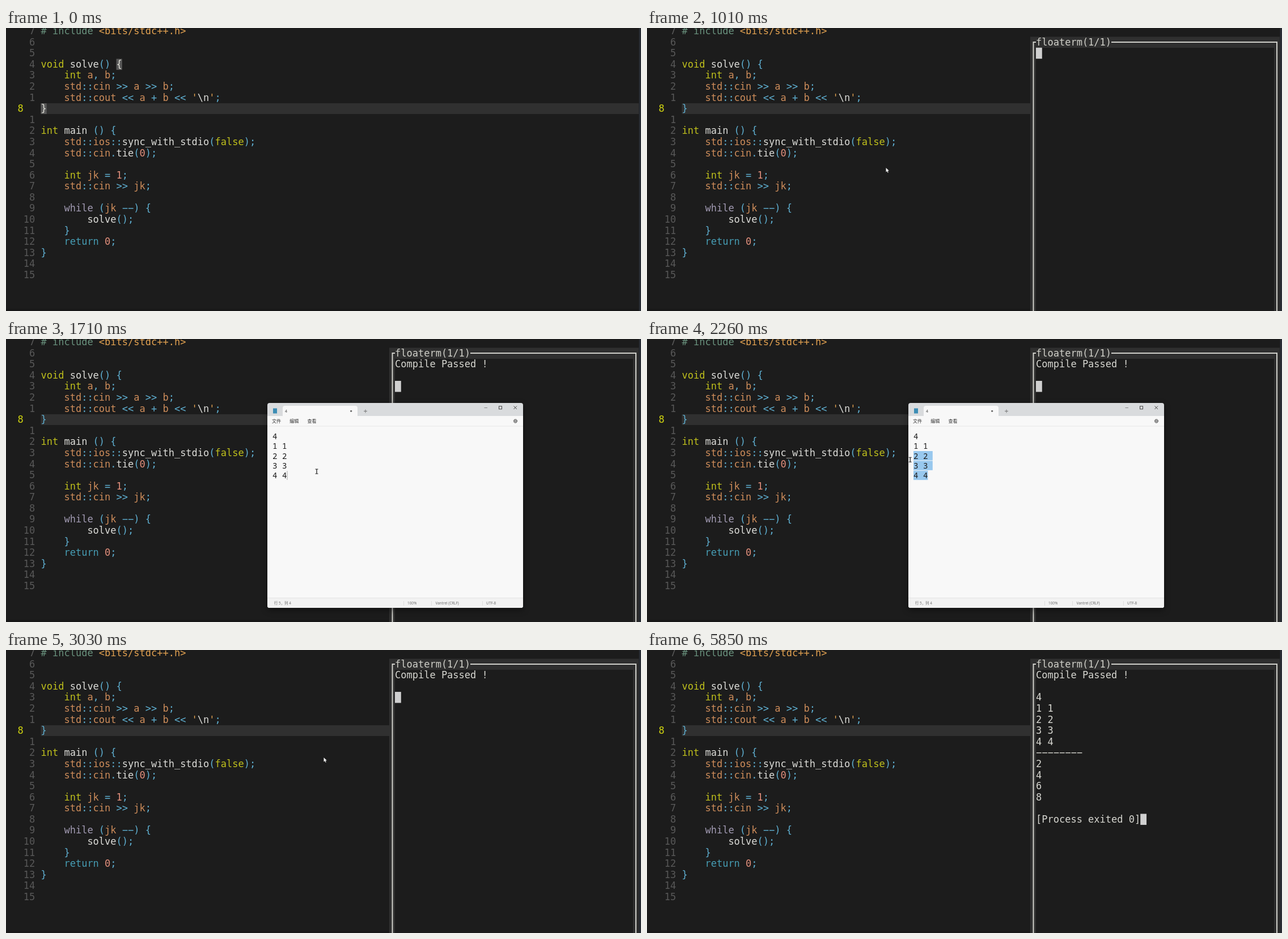
An HTML page with a canvas for the animation above (5.92 s loop, 1120 by 500 pixels).

```html
<!DOCTYPE html>
<html lang="en">
<head>
<meta charset="utf-8">
<title>Editor with floating terminal</title>
<style>
html, body { margin: 0; width: 100%; height: 100%; overflow: hidden; background: #1c1c1c; }
canvas { display: block; }
</style>
</head>
<body>
<canvas id="stage" width="1120" height="500"></canvas>
<script>
const ctx = document.getElementById('stage').getContext('2d');
const LOOP = 5920, CELL = 10.235, ROW = 19.59, LEFT = 61.5, TERM = 686;
const MONO = '"DejaVu Sans Mono", monospace';
const NOTE = '"Noto Sans Mono", monospace';
const UI = '"Open Sans", "Noto Sans CJK SC", "Noto Sans CJK", sans-serif';
const rowY = r => 5.4 + r * ROW;

const code = `# include <bits/stdc++.h>


void solve() {
    int a, b;
    std::cin >> a >> b;
    std::cout << a + b << '\\n';
}

int main () {
    std::ios::sync_with_stdio(false);
    std::cin.tie(0);

    int jk = 1;
    std::cin >> jk;

    while (jk --) {
        solve();
    }
    return 0;
}

`.split('\n');
const CURRENT = 7;

// Syntax rules: the first pattern that matches a token gives its colour
const rules = [
  [/^(# include)$/, '#68907c'],
  [/^<bits/, '#e0a050'],
  [/^(int|void|false)$/, '#bfc01c'],
  [/^while$/, '#a29bb3'],
  [/^return$/, '#469db4'],
  [/^(solve|main|sync_with_stdio|tie|\\n)$/, '#dcdcd8'],
  [/^\d/, '#e28f7c'],
  [/^'/, '#e0a050'],
  [/^\w/, '#cd8c5a'],
  [/./, '#5fb0d2']
];
const tokens = /# include|<bits[^>]*>|\\n|\w+|'|[^\s\w'\\]+/g;

function rect(x, y, w, h, color) {
  ctx.fillStyle = color;
  ctx.fillRect(x, y, w, h);
}

function text(s, x, y, color, size, family) {
  ctx.font = size + 'px ' + family;
  ctx.fillStyle = color;
  ctx.fillText(s, x, y + size * 0.36);
}

// Grid text; hyphens are drawn as wide as a minus sign
function mono(s, x, row, color) {
  text(s.replace(/-/g, '\u2212'), x, rowY(row) - 0.5, color, 17, MONO);
}

function line(points, color, width = 1) {
  ctx.strokeStyle = color;
  ctx.lineWidth = width;
  ctx.beginPath();
  points.forEach(([x, y]) => ctx.lineTo(x, y));
  ctx.stroke();
}

function drawEditor(focused) {
  rect(0, 0, 1120, 500, '#1c1c1c');
  rect(LEFT, 133, 1116 - LEFT, 19, '#303030');
  rect(0, 496, 1120, 4, '#181818');
  rect(1116.5, 0, 3.5, 500, '#292d34');
  if (focused) {
    rect(LEFT + 13 * CELL, 54.5, CELL, 19.5, '#585858');
    rect(LEFT, 133, CELL, 19, '#585858');
  }
  code.forEach((src, r) => {
    const n = Math.abs(r - CURRENT);
    if (n) mono(String(n).padStart(3), LEFT - 4 * CELL, r, '#585858');
    else mono('8', LEFT - 4 * CELL, r, '#d0d410');
    for (const m of src.matchAll(tokens)) {
      const brace = focused && (r === 3 && m[0] === '{' || r === CURRENT);
      const color = brace ? '#e0e0d8' : rules.find(([p]) => p.test(m[0]))[1];
      mono(m[0], LEFT + m.index * CELL, r, color);
    }
  });
}

const input = ['4', '1 1', '2 2', '3 3', '4 4'];

function terminalLines(t) {
  if (t < 1150) return [''];
  const out = ['Compile Passed !', ''];
  if (t < 3520) return [...out, ''];
  out.push(...input);
  if (t < 4620) return out;
  out.push('--------', '2', '4', '6', '8', '');
  return t < 4690 ? out : [...out, '[Process exited 0]'];
}

function drawTerminal(t) {
  rect(676, 15.5, 440, 484.5, '#2f2f2f');
  rect(686, 35, 420, 465, '#1c1c1c');
  const edge = '#cfcfca';
  line([[686, 25], [681.5, 25], [681.5, 500]], edge, 2);
  line([[819, 25], [1111, 25], [1111, 500]], edge, 2);
  mono('floaterm(1/1)', TERM, 1, '#cfcfc8');
  const lines = terminalLines(t), last = lines.length - 1;
  lines.forEach((s, i) => mono(s, TERM, i + 2, '#d6d6d0'));
  rect(TERM + lines[last].length * CELL, rowY(last + 2) - 9.8, 10.8, 19.5, '#d0d0d0');
}

const path = [
  [940, 422, 251], [1080, 422, 251], [1500, 548, 234], [1710, 548, 234],
  [1990, 499, 238], [2130, 466, 237], [2450, 461, 172], [2740, 561, 194], [LOOP, 561, 194]
];

function mouseAt(t) {
  const i = Math.max(1, path.findIndex(p => p[0] > t));
  const [t0, x0, y0] = path[i - 1], [t1, x1, y1] = path[i];
  const k = Math.min(1, Math.max(0, (t - t0) / (t1 - t0)));
  const e = k * k * (3 - 2 * k);
  return [x0 + (x1 - x0) * e, y0 + (y1 - y0) * e];
}

const NOTE_ROW = 17.35, NOTE_CELL = 8.45;

function drawSelection(t) {
  const [x, y] = mouseAt(Math.min(t, 2450));
  const first = Math.min(4, Math.max(0, Math.floor((y - 163) / NOTE_ROW)));
  const col = Math.min(3, Math.max(0, Math.round((x - 470) / NOTE_CELL)));
  for (let r = first; r < 5; r++) {
    const from = r === first ? Math.min(col, input[r].length) : 0;
    const to = input[r].length + (r < 4 ? 1 : 0);
    rect(470 + from * NOTE_CELL, 163.3 + r * NOTE_ROW, (to - from) * NOTE_CELL, 16.4, '#98c8ee');
  }
}

function drawNotepad(t) {
  const k = Math.min(1, (t - 1080) / 210), e = 1 - (1 - k) ** 3;
  const scale = 0.9 + 0.1 * e;
  ctx.save();
  ctx.globalAlpha = e;
  ctx.translate(686.5, 294);
  ctx.scale(scale, scale);
  ctx.translate(-686.5, -294);

  ctx.save();
  ctx.shadowColor = 'rgba(0,0,0,.4)';
  ctx.shadowBlur = 12;
  ctx.shadowOffsetY = 4;
  ctx.fillStyle = '#d9dbdd';
  ctx.beginPath();
  ctx.roundRect(461, 113, 451, 362, 4);
  ctx.fill();
  ctx.restore();
  ctx.clip();

  rect(461, 136, 451, 339, '#f8f8f8');
  ctx.beginPath();
  ctx.roundRect(488, 118, 132, 22, 4);
  ctx.fill();
  rect(461, 153.5, 451, 1, '#e7e7e7');
  rect(461, 457.5, 451, 18, '#f2f2f2');
  rect(461, 457, 451, 1, '#e4e4e4');
  [701, 750, 840].forEach(x => rect(x, 463, 1, 8, '#dddddd'));

  rect(471, 122.5, 7, 9, '#3c8db5');
  text('4', 492, 127, '#333', 7, UI);
  ctx.fillStyle = '#666';
  ctx.beginPath();
  ctx.arc(608.7, 127.3, 1.6, 0, 7);
  ctx.fill();
  line([[631, 127.5], [637, 127.5]], '#777');
  line([[634, 124.5], [634, 130.5]], '#777');

  const active = t < 2810;
  const button = active ? '#444' : '#777';
  line([[843.5, 121.5], [849, 121.5]], active ? '#888' : '#bbb');
  ctx.strokeStyle = button;
  ctx.strokeRect(869.5, 118.8, 5, 5);
  line([[895.5, 118.5], [901, 124]], button);
  line([[901, 118.5], [895.5, 124]], button);

  ['文件', '编辑', '查看'].forEach((s, i) => text(s, 469 + i * 31.2, 145.3, '#333', 8.1, UI));
  ctx.strokeStyle = '#555';
  for (const [r, dash] of [[3.3, [1.3, 1.29]], [2.6, []], [1, []]]) {
    ctx.setLineDash(dash);
    ctx.beginPath();
    ctx.arc(898.5, 145, r, 0, Math.PI * 2);
    ctx.stroke();
  }
  ctx.setLineDash([]);

  const status = [['行 5，列 4', 473], ['100%', 708], ['Vantrel (CRLF)', 757.5], ['UTF-8', 847]];
  status.forEach(([s, x]) => text(s, x, 467, '#666', 6.4, UI));

  if (t >= 1990) drawSelection(t);
  else rect(495.5, 233, 1, 16, '#aaa');
  input.forEach((s, i) => text(s, 470, 172 + i * NOTE_ROW, '#1c1c1c', 14.08, NOTE));
  ctx.restore();
}

function drawMouse(t, noteOpen) {
  const [x, y] = mouseAt(t);
  if (noteOpen && x > 461 && t < 2740) {
    line([[x - 2.5, y - 4], [x + 2.5, y - 4]], '#222');
    line([[x, y - 4], [x, y + 4]], '#222', 1.3);
    line([[x - 2.5, y + 4], [x + 2.5, y + 4]], '#222');
    return;
  }
  const s = noteOpen ? 1 : 0.8;
  const shape = [[0, 0], [0, 9.5], [2.2, 7.5], [3.8, 11], [5.3, 10.3], [3.8, 7], [6.8, 6.7]];
  ctx.beginPath();
  shape.forEach(([dx, dy]) => ctx.lineTo(x - 0.5 + dx * s, y - 5 + (noteOpen ? 0 : 1) + dy * s));
  ctx.closePath();
  ctx.fillStyle = noteOpen ? '#111' : '#f2f2f2';
  ctx.strokeStyle = noteOpen ? '#fff' : '#111';
  ctx.lineWidth = 0.6;
  ctx.stroke();
  ctx.fill();
}

function draw(now) {
  const t = now % LOOP;
  const noteOpen = t >= 1080 && t < 3030;
  drawEditor(t < 460);
  if (t >= 460) drawTerminal(t);
  if (noteOpen) drawNotepad(t);
  if (t >= 940 && t < 4550) drawMouse(t, noteOpen && t > 1220);
  requestAnimationFrame(draw);
}
requestAnimationFrame(draw);
</script>
</body>
</html>
```
